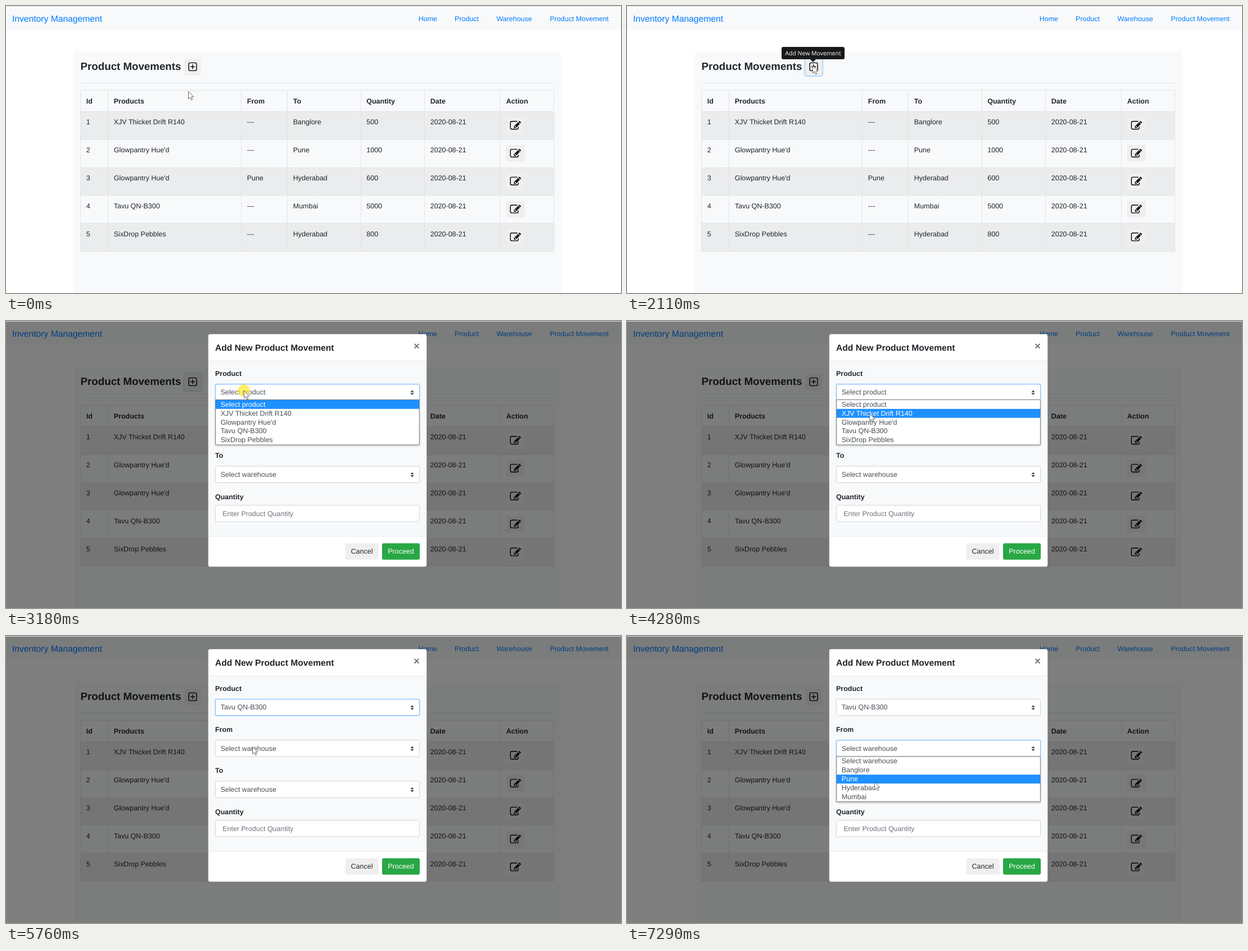
Animation of 1094x512 px, one loop 8000 ms. Source, as an HTML page with a canvas:

```html
<!DOCTYPE html>
<html lang="en">
<head>
<meta charset="utf-8">
<title>Inventory Management</title>
<style>
  html, body { margin: 0; width: 100%; height: 100%; overflow: hidden; background: #fff; }
  canvas { display: block; }
</style>
</head>
<body>
<canvas id="stage" width="1094" height="512"></canvas>
<script>
const ctx = document.getElementById('stage').getContext('2d');
const LOOP = 8000;
const SANS = '"Liberation Sans", Arial, sans-serif';
const REM = 12.48;
const ICON = 0.01088; // pixels per icon unit
const INK = '#212529', FIELD_INK = '#495057', LINE = '#e1e4e8', PANEL = '#f8f9fa', BUTTON = '#efefef';

const PRODUCTS = ['XJV Thicket Drift R140', "Glowpantry Hue'd", 'Tavu QN-B300', 'SixDrop Pebbles'];
const CITIES = ['Banglore', 'Pune', 'Hyderabad', 'Mumbai'];
const HEADS = ['Id', 'Products', 'From', 'To', 'Quantity', 'Date', 'Action'];
const COLS = [132.5, 181.5, 418.5, 500.5, 631, 744.5, 879.5, 974.5];
const ROWS = [
  [PRODUCTS[0], '---', CITIES[0], '500'],
  [PRODUCTS[1], '---', CITIES[1], '1000'],
  [PRODUCTS[1], CITIES[1], CITIES[2], '600'],
  [PRODUCTS[2], '---', CITIES[3], '5000'],
  [PRODUCTS[3], '---', CITIES[2], '800'],
];

// Pointer moves: start, end, number of steps, x, y
const MOVES = [
  [70, 380, 5, 318, 121],
  [1240, 1470, 4, 330, 106],
  [2630, 2950, 5, 423, 124],
  [3820, 4590, 11, 436, 188],
  [4670, 4830, 3, 437, 196],
  [5760, 5760, 1, 438, 197],
  [6370, 6600, 4, 440, 228],
  [6680, 7140, 7, 440, 253],
  [7220, 7290, 2, 440, 260],
];
const CLICKS = [[1940, 2110], [3180, 3340], [5070, 5300], [5990, 6220]];

const within = (t, a, b) => t >= a && t < b;

// Progress from 0 to 1 in n even jumps, the first at a and the last at b
function steps(t, a, b, n) {
  if (t < a) return 0;
  if (n === 1 || t >= b) return 1;
  return Math.min(n, Math.floor((t - a + 8) / (b - a) * (n - 1)) + 1) / n;
}

function pointerAt(t) {
  let x = 324, y = 152;
  for (const [a, b, n, tx, ty] of MOVES) {
    const p = steps(t, a, b, n);
    x += (tx - x) * p;
    y += (ty - y) * p;
    if (p < 1) break;
  }
  return { x, y };
}

function text(str, x, y, { size = REM, color = INK, bold = false, align = 'left', family = SANS } = {}) {
  ctx.font = `${bold ? 'bold ' : ''}${size}px ${family}`;
  ctx.fillStyle = color;
  ctx.textAlign = align;
  ctx.fillText(str, x, y);
}

function rect(x, y, w, h, color) {
  ctx.fillStyle = color;
  ctx.fillRect(x, y, w, h);
}

function box(x, y, w, h, r, fill, stroke, lineWidth = 1) {
  ctx.beginPath();
  ctx.roundRect(x, y, w, h, r);
  if (fill) { ctx.fillStyle = fill; ctx.fill(); }
  if (stroke) { ctx.strokeStyle = stroke; ctx.lineWidth = lineWidth; ctx.stroke(); }
}

function polygon(points, fill) {
  ctx.beginPath();
  points.forEach(([x, y]) => ctx.lineTo(x, y));
  ctx.closePath();
  ctx.fillStyle = fill;
  ctx.fill();
}

function line(x1, y1, x2, y2, color, width = 1) {
  ctx.beginPath();
  ctx.moveTo(x1, y1);
  ctx.lineTo(x2, y2);
  ctx.strokeStyle = color;
  ctx.lineWidth = width;
  ctx.stroke();
}

function drawNav() {
  const link = '#007bff';
  rect(0, 0, 1094, 43.5, PANEL);
  text('Inventory Management', 11, 27.6, { size: 15.65, color: link });
  [['Home', 733.7], ['Product', 798.1], ['Warehouse', 872.4], ['Product Movement', 967.4]]
    .forEach(([label, x]) => text(label, x, 26.6, { color: link }));
}

function drawPlusButton(ring) {
  if (ring) {
    ctx.globalAlpha = ring;
    box(316.3, 93.3, 31.6, 31.6, 4, null, '#b9d9fb', 2.6);
    ctx.globalAlpha = 1;
  }
  box(317.5, 94.5, 29.2, 29.2, 3, BUTTON);
  ctx.save();
  ctx.translate(324.4, 100.7);
  ctx.scale(ICON, ICON);
  box(64, 64, 1280, 1280, 224, null, '#000', 128);
  line(704, 320, 704, 1088, '#000', 128);
  line(320, 704, 1088, 704, '#000', 128);
  ctx.restore();
}

function drawEditButton(y) {
  box(889.7, y, 33.2, 29.4, 3, BUTTON);
  ctx.save();
  ctx.translate(896.6, y + 5.4);
  ctx.scale(ICON, ICON);
  // Sheet, open at the top right
  ctx.beginPath();
  ctx.moveTo(1344, 1070);
  ctx.arcTo(1344, 1472, 1120, 1472, 224);
  ctx.arcTo(64, 1472, 64, 1248, 224);
  ctx.arcTo(64, 192, 288, 192, 224);
  ctx.lineTo(1120, 192);
  ctx.lineTo(1190, 205);
  ctx.strokeStyle = '#000';
  ctx.lineWidth = 128;
  ctx.stroke();
  // Pencil body, tip, shine and end
  polygon([[1312, 320], [1600, 608], [928, 1280], [640, 1280], [640, 992]], '#000');
  polygon([[888, 1184], [1004, 1068], [852, 916], [736, 1032], [736, 1088], [832, 1088], [832, 1184]], BUTTON);
  line(955, 837, 1318, 474, BUTTON, 46);
  polygon([[1664, 544], [1376, 256], [1468, 164], [1536, 136], [1604, 164], [1756, 316], [1784, 384], [1756, 452]], '#000');
  ctx.restore();
}

function drawTable() {
  const top = 150.5, bodyTop = 188.5, rowH = 49.8, bottom = 437.5;
  ROWS.forEach((row, i) => {
    if (i % 2 === 0) rect(COLS[0], bodyTop + i * rowH, 842, rowH, 'rgba(0,0,0,.05)');
  });
  COLS.forEach(x => line(Math.floor(x) + 0.5, top, Math.floor(x) + 0.5, bottom, LINE));
  line(132, top, 975, top, LINE);
  ROWS.forEach((row, i) => {
    const y = Math.floor(bodyTop + i * rowH) + 0.5;
    line(132, y, 975, y, LINE, i ? 1 : 1.5);
  });
  line(132, bottom, 975, bottom, LINE);

  HEADS.forEach((head, c) => text(head, COLS[c] + 10.3, 173.5, { bold: true }));
  ROWS.forEach((row, i) => {
    const cells = [String(i + 1), ...row, '2020-08-21'];
    cells.forEach((cell, c) => text(cell, COLS[c] + 10.3, 211.3 + i * rowH));
    drawEditButton(198.3 + i * rowH);
  });
}

function drawPage(ring) {
  rect(0, 0, 1094, 512, '#fff');
  drawNav();
  box(120.5, 81.5, 867, 450, 3, PANEL);
  text('Product Movements', 132.6, 114.4, { size: 18.72, bold: true });
  drawPlusButton(ring);
  line(132.5, 137.5, 975, 137.5, '#e3e4e5');
  drawTable();
}

function drawSelect(y, value, focused) {
  box(372.3, y, 363.4, 29.4, 3, '#fff', focused ? '#80bdff' : '#ced4da', focused ? 1.3 : 1);
  text(value, 381.7, y + 18.7, { color: FIELD_INK });
  const mid = y + 15;
  polygon([[719.4, mid - 0.8], [722.5, mid - 4.2], [725.6, mid - 0.8]], '#343a40');
  polygon([[719.4, mid + 0.9], [722.5, mid + 4.3], [725.6, mid + 0.9]], '#343a40');
}

function drawList(top, items, pointerY) {
  const rowH = 15.9;
  const active = Math.max(0, Math.floor((pointerY - top) / rowH));
  ctx.save();
  ctx.shadowColor = 'rgba(0,0,0,.3)';
  ctx.shadowBlur = 4;
  ctx.shadowOffsetY = 1;
  box(372.5, top - 0.4, 362.8, rowH * items.length + 1, 0, '#fff');
  ctx.restore();
  box(372.5, top - 0.4, 362.8, rowH * items.length + 1, 0, null, '#767b80');
  items.forEach((item, i) => {
    if (i === active) rect(372.8, top + i * rowH, 362.2, rowH, '#1e90ff');
    text(item, 381.7, top + 11.8 + i * rowH, { color: i === active ? '#fff' : FIELD_INK });
  });
}

function drawModal(t, pointerY) {
  const picked = t >= 5300;
  const firstOpen = within(t, 3180, 5300);
  const secondOpen = t >= 5990;
  box(359.6, 23.2, 388.8, 415.2, 3.5, '#fff', 'rgba(0,0,0,.2)', 0.8);
  rect(360, 72, 388, 312, PANEL);
  line(360, 71.5, 748, 71.5, '#e6e9ec');
  line(360, 383.9, 748, 383.9, '#e6e9ec');
  text('Add New Product Movement', 372, 52.5, { size: 15.6, bold: true });
  text('×', 730.4, 51, { size: 18.72, bold: true, color: '#777', align: 'center' });

  ['Product', 'From', 'To', 'Quantity']
    .forEach((label, i) => text(label, 372, 97.8 + i * 73.25, { bold: true }));
  drawSelect(112.6, picked ? PRODUCTS[2] : 'Select product', within(t, 3180, 5990));
  drawSelect(185.9, 'Select warehouse', secondOpen);
  drawSelect(259.1, 'Select warehouse', false);
  box(372.3, 328.8, 363.4, 29.2, 3, '#fff', '#ced4da');
  text('Enter Product Quantity', 385.2, 347.6, { color: '#6c757d' });

  box(603.6, 396.4, 59, 29.4, 3, BUTTON);
  text('Cancel', 633, 415.4, { align: 'center' });
  box(669, 396.4, 67, 29.4, 3, '#28a745');
  text('Proceed', 702.5, 415.4, { color: '#fff', align: 'center' });

  if (firstOpen) drawList(140.9, ['Select product', ...PRODUCTS], pointerY);
  if (secondOpen) drawList(215.5, ['Select warehouse', ...CITIES], pointerY);
}

function drawTooltip(alpha) {
  if (alpha <= 0) return;
  ctx.globalAlpha = alpha;
  box(275, 73, 112, 22, 3, '#191919');
  polygon([[326, 95], [336, 95], [331, 100]], '#191919');
  text('Add New Movement', 331, 88, {
    size: 10.5, color: '#fff', align: 'center', family: '"Open Sans", sans-serif',
  });
  ctx.globalAlpha = 1;
}

function drawPointer({ x, y }, pressed) {
  if (pressed) {
    ctx.beginPath();
    ctx.arc(x, y, 10.7, 0, Math.PI * 2);
    ctx.fillStyle = 'rgba(255,232,40,.72)';
    ctx.fill();
  }
  ctx.save();
  ctx.translate(x + 0.5, y + 0.5);
  polygon([[0, 0], [0, 13.2], [3.1, 10.4], [5.2, 15.2], [7.3, 14.3], [5.2, 9.6], [9.4, 9.6]], '#fff');
  ctx.strokeStyle = '#444';
  ctx.lineWidth = 0.8;
  ctx.stroke();
  ctx.restore();
}

function draw(t) {
  const pointer = pointerAt(t);
  const ring = steps(t, 1940, 2110, 3) * (1 - steps(t, 3180, 3270, 2));
  const tip = steps(t, 1320, 1470, 3) * (1 - steps(t, 2180, 2320, 3));
  drawPage(ring);
  if (t >= 2180) {
    rect(0, 0, 1094, 512, 'rgba(0,0,0,.5)');
    drawModal(t, pointer.y);
  }
  rect(0, 0, 1094, 1, '#dfe1e4');
  drawTooltip(tip);
  drawPointer(pointer, CLICKS.some(([a, b]) => within(t, a, b)));
}

ctx.textRendering = 'geometricPrecision';
const start = performance.now();
function tick() {
  draw((performance.now() - start) % LOOP);
  requestAnimationFrame(tick);
}
tick();
</script>
</body>
</html>
```
